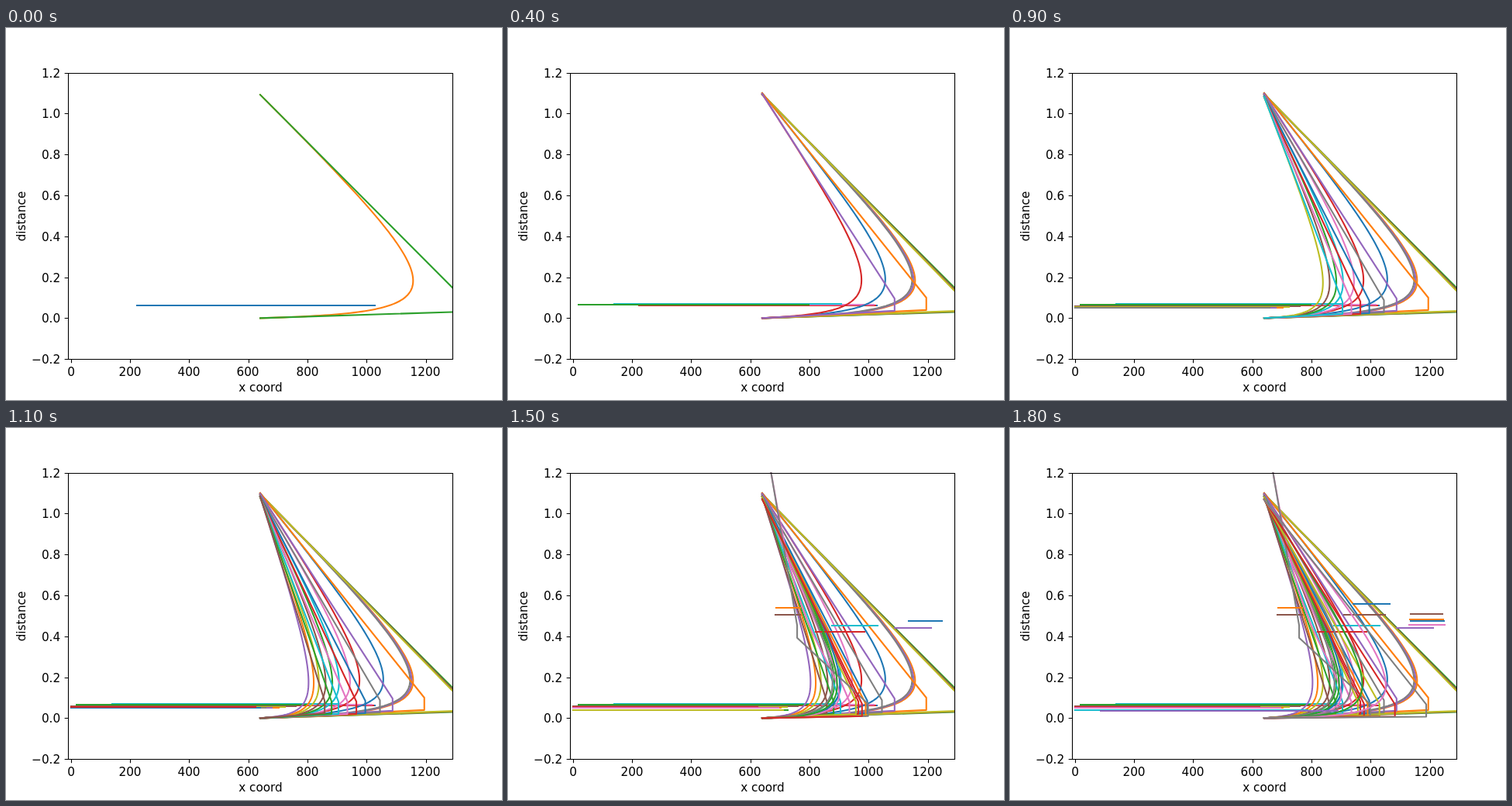
Write an HTML page that moves like this. It is 640x480 px and loops after 1.9 s.

```html
<!DOCTYPE html>
<html lang="en">
<head>
<meta charset="utf-8">
<title>Distance over x coord</title>
<style>
  html, body { margin: 0; width: 100%; height: 100%; overflow: hidden; background: #fff; }
  svg { display: block; width: 640px; height: 480px; }
  text { font: 15.28px "DejaVu Sans", sans-serif; }
  .data { fill: none; stroke-width: 2.083; stroke-linejoin: round; stroke-linecap: square; }
  .axes { fill: none; stroke: #000; stroke-width: 1.11; }
</style>
</head>
<body>
<svg viewBox="0 0 640 480">
  <clipPath id="area"><rect x="80" y="57.6" width="496" height="369.6"/></clipPath>
  <g id="data" class="data" clip-path="url(#area)"></g>
  <g id="axes"></g>
</svg>
<script>
const STEP = 100;
const COUNT = 19;
const START_X = 640;
const MARGIN = 0.375;   // clearance beside a bar, as a share of its width
const HALF = 0.03;      // half depth of a bar
const COLORS = ['#1f77b4', '#ff7f0e', '#2ca02c', '#d62728', '#9467bd',
                '#8c564b', '#e377c2', '#7f7f7f', '#bcbd22', '#17becf'];

// The near bar, as [step, value] keys joined by straight lines
const near = {
  y: [[0, .062], [2, .066], [3, .07], [4, .066], [5, .058], [7, .051], [10, .051],
      [11, .054], [12, .05], [13, .04], [15, .04], [18, .037]],
  left: [[2, 224], [3, 139], [4, 18], [5, 0], [17, 0], [18, 88]],
  right: [[0, 1028], [2, 1018], [4, 796], [6, 724], [9, 658], [11, 624], [12, 696],
          [13, 720], [14, 726], [15, 711], [17, 787], [18, 888]]
};

// Far bars drift in late; they look narrower the further away they are
const far = [
  { last: 17, size: 70, x: [[14, 903], [15, 954], [17, 1003]], y: [[14, .423], [15, .453], [17, .558]] },
  { last: 18, size: 54, x: [[14, 1150], [15, 1191], [18, 1189]], y: [[14, .44], [15, .475], [16, .456], [18, .51]] },
  { last: 15, size: 43, x: [[14, 726], [15, 728]], y: [[14, .505], [15, .54]] }
];

const px = x => 80 + (x + 10) * 496 / 1300;
const py = y => 374.4 - y * 264;
const lerp = (a, b, t) => a + (b - a) * t;

function valueAt(keys, step) {
  const i = keys.findIndex(([s]) => s >= step);
  if (i < 0) return keys[keys.length - 1][1];
  if (i === 0) return keys[0][1];
  const [[s0, v0], [s1, v1]] = keys.slice(i - 1, i + 1);
  return lerp(v0, v1, (step - s0) / (s1 - s0));
}

function barsAt(step) {
  const bars = [{
    y: valueAt(near.y, step),
    left: valueAt(near.left, step),
    right: valueAt(near.right, step)
  }];
  for (const bar of far) {
    if (step < bar.x[0][0] || step > bar.last) continue;
    const y = valueAt(bar.y, step), x = valueAt(bar.x, step), half = bar.size / y / 2;
    bars.push({ y, left: x - half, right: x + half });
  }
  return bars;
}

// Pass the near bar on its right; if the way back hits a far bar, pass that on its left
function route([first, ...others]) {
  const gap = bar => MARGIN * (bar.right - bar.left);
  const side = first.right + gap(first);
  const wayBack = y => lerp(side, START_X, y - first.y - HALF);
  const hit = others.find(bar => {
    const x = wayBack(bar.y);
    return x > bar.left && x < bar.right;
  });
  const along = (x, bar) => [[x, bar.y - HALF], [x, bar.y + HALF]];
  return [
    [START_X, 0],
    ...along(side, first),
    ...(hit ? along(hit.left - gap(hit), hit) : []),
    [START_X, (hit || first).y + HALF + 1]
  ];
}

function bezierAt(points, t) {
  let p = points;
  while (p.length > 1)
    p = p.slice(1).map(([x, y], i) => [lerp(p[i][0], x, t), lerp(p[i][1], y, t)]);
  return p[0];
}

const bezier = points => Array.from({ length: 101 }, (_, i) => bezierAt(points, i / 100));

const toPath = points =>
  'M' + points.map(([x, y]) => px(x).toFixed(2) + ' ' + py(y).toFixed(2)).join('L');

function add(parent, tag, attrs, text) {
  const el = document.createElementNS('http://www.w3.org/2000/svg', tag);
  for (const key in attrs) el.setAttribute(key, attrs[key]);
  if (text) el.textContent = text;
  return parent.appendChild(el);
}

let colorIndex = 0;

function drawStep(step) {
  const group = add(document.getElementById('data'), 'g', {});
  const stroke = d => add(group, 'path', { d, stroke: COLORS[colorIndex++ % COLORS.length] });
  const bars = barsAt(step);
  for (const { y, left, right } of bars)
    stroke(`M${Math.round(px(left))} ${Math.round(py(y))}H${Math.round(px(right))}`);
  const points = route(bars);
  stroke(toPath(bezier(points)));
  stroke(toPath(points));
  return group;
}

function drawAxes() {
  const axes = document.getElementById('axes');
  const snap = v => Math.round(v) + 0.5;
  const label = (x, y, anchor, text) => add(axes, 'text', { x, y, 'text-anchor': anchor }, text);
  let d = 'M80.5 58.5H576.5V427.5H80.5Z';
  for (let v = 0; v <= 1200; v += 200) {
    const text = String(v), half = 5 * text.length;
    d += `M${snap(px(v))} 427.5v4.86`;
    label(Math.round(px(v) - half - 0.3) + half, 449, 'middle', text);
  }
  for (let i = -1; i <= 6; i++) {
    const y = py(i / 5);
    d += `M80.5 ${snap(y)}h-4.86`;
    label(70.2, Math.round(y + 6), 'end', (i / 5).toFixed(1).replace('-', '\u2212'));
  }
  add(axes, 'path', { d, class: 'axes' });
  label(328.5, 469, 'middle', 'x coord');
  label(0, 0, 'middle', 'distance').setAttribute('transform', 'translate(25 243) rotate(-90)');
}

drawAxes();
for (let step = 0; step < COUNT; step++) {
  const group = drawStep(step);
  if (!step) continue;
  const offset = step / COUNT;
  const anim = group.animate([
    { opacity: 0, offset: 0 }, { opacity: 0, offset },
    { opacity: 1, offset }, { opacity: 1, offset: 1 }
  ], { duration: STEP * COUNT, iterations: Infinity });
  anim.startTime = 0;
}
</script>
</body>
</html>
```
